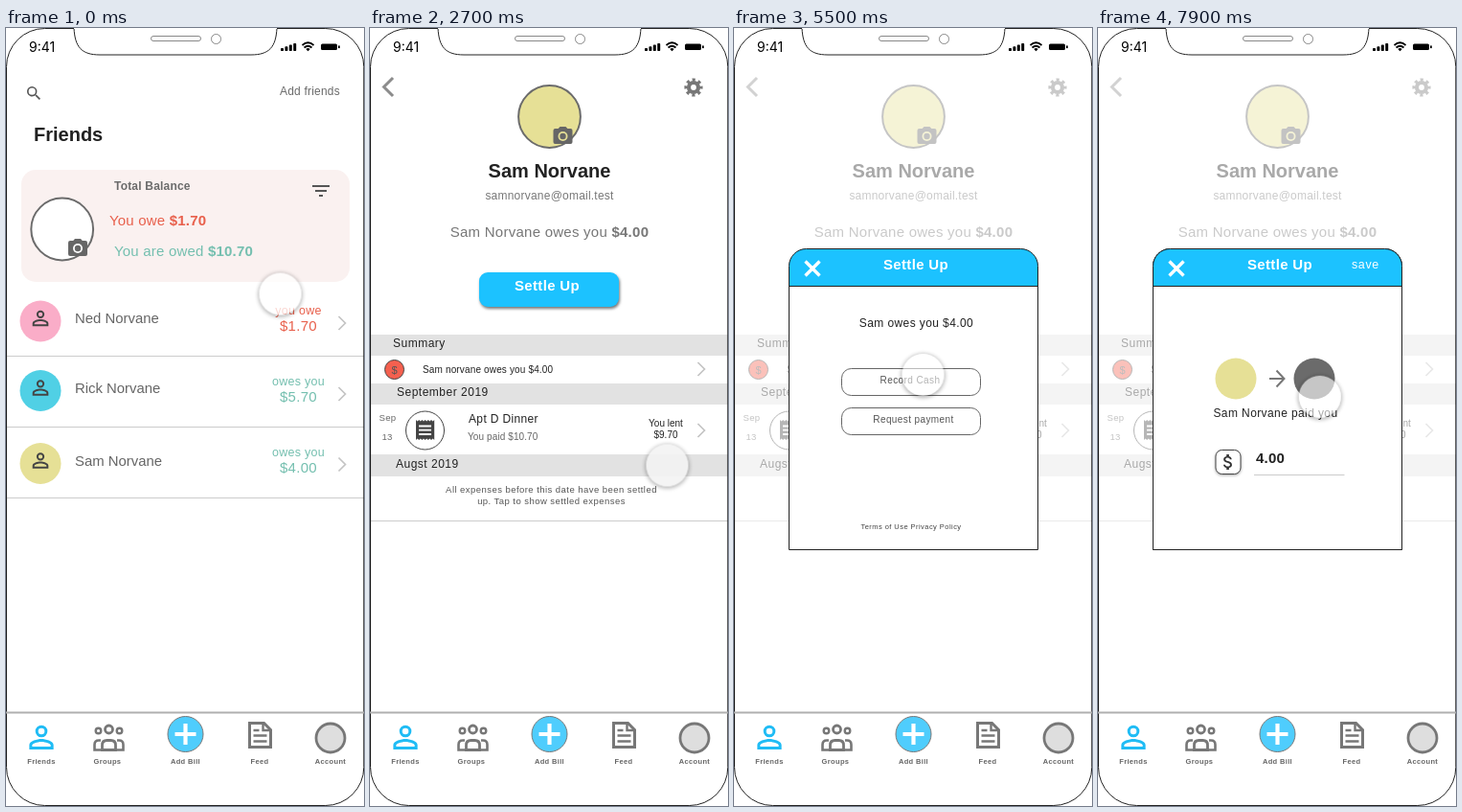
Recreate the animation shown at these times as an HTML page. Size 374 by 812 pixels, loop 8 s.

```html
<!DOCTYPE html>
<html lang="en">
<head>
<meta charset="utf-8">
<title>Settle up</title>
<style>
  html, body { margin: 0; width: 100%; height: 100%; overflow: hidden; background: #fff; }
  svg { position: absolute; left: 0; top: 0; display: block; }
  text { font-family: "Liberation Sans", Arial, sans-serif; white-space: pre; }
  .b { font-weight: bold; }
  #touch {
    position: absolute; left: -22px; top: -22px; width: 44px; height: 44px;
    border-radius: 50%; box-shadow: 0 1px 4px 1px rgba(0, 0, 0, .3);
  }
</style>
</head>
<body>
<svg id="stage" width="374" height="812" viewBox="0 0 374 812"></svg>
<div id="touch"></div>
<script>
const GREY = '#6b6b6b', INK = '#222', BLUE = '#1cc2ff', RED = '#e8604c',
      GREEN = '#74bfaf', YELLOW = '#e6e096', BAR = '#e2e2e2', RULE = '#ccc';

// Icon outlines on a 24 by 24 grid
const ICONS = {
  person: 'M12 5.9a2.1 2.1 0 1 1 0 4.2a2.1 2.1 0 0 1 0-4.2m0 9c2.97 0 6.1 1.46 6.1 2.1v1.1H5.9V17c0-.64 3.13-2.1 6.1-2.1M12 4a4 4 0 1 0 0 8a4 4 0 0 0 0-8zm0 9c-2.67 0-8 1.34-8 4v3h16v-3c0-2.66-5.33-4-8-4z',
  camera: 'M9 2L7.17 4H4a2 2 0 0 0-2 2v12a2 2 0 0 0 2 2h16a2 2 0 0 0 2-2V6a2 2 0 0 0-2-2h-3.17L15 2z',
  search: 'M15.5 14h-.79l-.28-.27A6.5 6.5 0 1 0 13.73 14.43l.27.28v.79l5 4.99L20.49 19zm-6 0a4.5 4.5 0 1 1 0-9a4.5 4.5 0 0 1 0 9z',
  dollar: 'M11.8 10.9c-2.27-.59-3-1.2-3-2.15 0-1.09 1.01-1.85 2.7-1.85 1.78 0 2.44.85 2.5 2.1h2.21c-.07-1.72-1.12-3.3-3.21-3.81V3h-3v2.16c-1.94.42-3.5 1.68-3.5 3.61 0 2.31 1.91 3.46 4.7 4.13 2.5.6 3 1.48 3 2.41 0 .69-.49 1.79-2.7 1.79-2.06 0-2.87-.92-2.98-2.1h-2.2c.12 2.19 1.76 3.42 3.68 3.83V21h3v-2.15c1.95-.37 3.5-1.5 3.5-3.55 0-2.84-2.43-3.81-4.7-4.4z'
};

// Drawing helpers
const text = (x, y, s, size, fill = INK, ls = 0, cls = '', anchor = 'start') =>
  `<text x="${x}" y="${y}" font-size="${size}" fill="${fill}" letter-spacing="${ls}" class="${cls}" text-anchor="${anchor}">${s}</text>`;
const mid = (x, y, s, size, fill, ls, cls) => text(x, y, s, size, fill, ls, cls, 'middle');
const bold = s => `<tspan class="b">${s}</tspan>`;
const line = (d, stroke, w = 1) => `<path d="${d}" fill="none" stroke="${stroke}" stroke-width="${w}"/>`;
const shape = (d, fill) => `<path d="${d}" fill="${fill}" fill-rule="evenodd"/>`;
const disc = (x, y, r, fill, stroke = 'none', w = 1) =>
  `<circle cx="${x}" cy="${y}" r="${r}" fill="${fill}" stroke="${stroke}" stroke-width="${w}"/>`;
const box = (x, y, w, h, r, fill, stroke = 'none', more = '') =>
  `<rect x="${x}" y="${y}" width="${w}" height="${h}" rx="${r}" fill="${fill}" stroke="${stroke}" ${more}/>`;
const group = (id, ...parts) => `<g id="${id}">${parts.join('')}</g>`;
const icon = (name, x, y, k, fill) =>
  `<g transform="translate(${x} ${y}) scale(${k}) translate(-12 -12)">${shape(ICONS[name], fill)}</g>`;

const chevron = (x, y) => line(`M${x} ${y - 7}l7 7l-7 7`, '#c4c4c4', 1.7);
const camera = (x, y, lens) =>
  icon('camera', x, y, 1, '#666') + disc(x, y, 5, lens) + disc(x, y, 3.2, '#666');

const friend = (y, name, label, sum, color, hue, cy, ty) => [
  disc(36, cy, 21.5, hue), icon('person', 36, cy - 3, 1.04, '#444'),
  text(72, ty, name, 14.9, '#666'),
  mid(305.5, y - 9, label, 12.5, color, .3), mid(305.5, y + 8, sum, 15, color, .3),
  chevron(347.5, y)
].join('');

const friends = group('friends',
  icon('search', 29.2, 68.2, .8, '#555'),
  text(286, 70, 'Add friends', 12, GREY, .2),
  text(29, 118, 'Friends', 20, INK, 0, 'b'),
  box(16, 148, 343, 117, 15, '#faf1f0'),
  disc(58.7, 210, 32.4, '#fff', GREY, 2), camera(75, 230, '#fff'),
  line('M320 165h18M323 170h12M327 175h4', '#555', 2),
  text(113, 169, 'Total Balance', 12, GREY, .2, 'b'),
  text(108, 206, 'You owe ' + bold('$1.70'), 15, RED, .2),
  text(113, 238, 'You are owed ' + bold('$10.70'), 15, GREEN, .2),
  friend(308, 'Ned Norvane', 'you owe', '$1.70', RED, '#faadc8', 306, 308),
  friend(382, 'Rick Norvane', 'owes you', '$5.70', GREEN, '#50d0e5', 378.5, 381),
  friend(455.5, 'Sam Norvane', 'owes you', '$4.00', GREEN, YELLOW, 454.5, 457),
  line('M0 342.5H374M0 416.5H374M0 490.5H374', RULE));

const heading = (x, y, h, s, ty) => box(0, y, 374, h, 0, BAR) + text(x, ty, s, 12, INK, .5);

const detail = group('detail',
  box(0, 40, 374, 672, 0, '#fff'),
  line('M24 52l-9.5 9.5l9.5 9.5', '#8c8c8c', 3),
  disc(338, 62, 5, 'none', '#777', 4.2),
  `<circle cx="338" cy="62" r="8" fill="none" stroke="#777" stroke-width="3.2" stroke-dasharray="3.14 3.14" stroke-dashoffset="1.57"/>`,
  disc(187.5, 92.5, 32.4, YELLOW, GREY, 2), camera(201.5, 113, YELLOW),
  mid(187.5, 156, 'Sam Norvane', 20, INK, 0, 'b'),
  mid(187.5, 179, 'samnorvane@omail.test', 12, '#777', .22),
  mid(187.5, 218, 'Sam Norvane owes you ' + bold('$4.00'), 15, '#777', .25),
  box(114, 255, 146, 36, 9, BLUE, 'none', 'style="filter:drop-shadow(1px 2px 1.5px rgba(0,0,0,.55))"'),
  mid(185, 274, 'Settle Up', 15, '#fff', .35, 'b'),
  heading(24, 320, 22, 'Summary', 333),
  heading(28, 371, 22, 'September 2019', 384),
  heading(27, 445, 23, 'Augst 2019', 459),
  disc(25.5, 356.5, 10, '#f4604f', '#444'), mid(25.5, 360.5, '$', 11, '#555'),
  text(55, 360, 'Sam norvane owes you $4.00', 10, INK, .15),
  chevron(342.5, 356), chevron(342.5, 420),
  text(9.5, 410, 'Sep', 9.5, '#666', .3), text(12.5, 430, '13', 9.5, '#666', .3),
  disc(57.5, 420, 20, '#fff', '#444'),
  shape('M48 409l1.6 1.6' + 'l1.6-1.6l1.6 1.6'.repeat(5) + 'l1.6-1.6v21' + 'l-1.6-1.6l-1.6 1.6'.repeat(6) + 'z', '#444'),
  line('M51 415.5h13M51 419.7h13M51 424h13', '#fff', 1.8),
  text(103, 412, 'Apt D Dinner', 12, INK, .35), text(102, 430, 'You paid $10.70', 10, '#666', .1),
  mid(309, 416, 'You lent', 10), mid(309, 428, '$9.70', 10),
  mid(189.5, 485, 'All expenses before this date have been settled', 9.5, '#555', .45),
  mid(189.5, 497, 'up. Tap to show settled expenses', 9.5, '#555', .45),
  line('M0 514.5H374', RULE));

// Dialog frame shared by every step of the payment
const TOP = 'V248.5a18 18 0 0 1 18-18h224a18 18 0 0 1 18 18';
const dialog = (...parts) => [
  shape(`M57.5 544.5${TOP}V544.5z`, '#fff'),
  shape(`M57.5 269.5${TOP}V269.5z`, BLUE),
  line(`M57.5 269.5h260M57.5 544.5${TOP}V544.5z`, INK),
  line('M74.5 243.5l15 15m0-15l-15 15', '#fff', 3.4),
  mid(190, 252, 'Settle Up', 15, '#fff', .35, 'b'), ...parts
].join('');

const option = (y, x, s) => box(112.5, y, 145, 28, 10, '#fff', '#666') + mid(x, y + 15.5, s, 10, '#555', .4);

const choose = group('choose',
  box(1, 40, 372, 672, 0, 'rgba(255,255,255,.61)'),
  dialog(
    mid(190.5, 312, 'Sam owes you $4.00', 12, INK, .4),
    option(355.5, 184, 'Record Cash'), option(396.5, 187.5, 'Request payment'),
    mid(185, 523, 'Terms of Use Privacy Policy', 7.5, '#444', .45)));

const payment = (saveOpacity, field) => dialog(
  `<g opacity="${saveOpacity}">${text(265, 251, 'save', 12.5, '#fff', .6)}</g>`,
  disc(144, 366, 21.5, YELLOW), disc(226, 366, 21.5, GREY),
  line('M179 366h15m-7.5-8.5l8 8.5l-8 8.5', '#777', 2),
  mid(185.5, 406, 'Sam Norvane paid you', 12, INK, .4),
  box(123, 440.5, 26, 25, 6.5, '#fff', '#444', 'style="filter:drop-shadow(0 1px 1.5px rgba(0,0,0,.35))"'),
  icon('dollar', 136, 453, .88, '#333'),
  line('M163 466.5h94.5', RULE), field);

const empty = group('empty', payment(.5, line('M163 450v11.5', '#333')));
const filled = group('filled', payment(1, text(165, 454, '4.00', 15, INK, .2, 'b')));

const tab = (x, s) => mid(x, 767.5, s, 7.5, '#666', .35, 'b');
const NOTCH = 'M71 0C72 20 79 28 98 28H256C275 28 282 20 283 0';
const chrome = group('chrome',
  box(.5, .5, 373.3, 811, 40, 'none', INK),
  shape(NOTCH, '#fff'), line(NOTCH, INK),
  line('M71 .5H283', '#fff', 1.2),
  box(151.5, 8.5, 52, 5, 2.5, '#fff', '#888'), disc(219.5, 11.5, 5, '#fff', '#888'),
  `<text x="24" y="25" font-size="14" style="font-family:Inter,sans-serif">9:41</text>`,
  [0, 1, 2, 3].map(i => box(287 + i * 4.4, 21 - i * 1.7, 3, 3 + i * 1.7, .8, '#000')).join(''),
  line('M309.5 18q6-5.5 12 0M311.5 20.5q4-3.5 8 0', '#000', 1.7),
  shape('M313.3 22q2.2-1.8 4.4 0l-2.2 2.3z', '#000'),
  box(329, 16.5, 17, 6.5, 1.5, '#000'), box(347, 18.2, 1.8, 3, .8, '#000'),
  line('M0 714.5H374', '#b0b0b0', 2),
  icon('person', 37, 740.3, 1.58, '#1fbcf5'),
  disc(107.5, 732, 4, 'none', '#777', 2.8),
  line('M100.5 753.5v-5q0-5 5-5h4q5 0 5 5v5z', '#777', 2.8),
  disc(96.5, 733.5, 2.8, 'none', '#777', 2.4), disc(118.5, 733.5, 2.8, 'none', '#777', 2.4),
  line('M100 753.5h-7.5v-5.5q0-4.5 4.5-4.5h2M115 753.5h7.5v-5.5q0-4.5-4.5-4.5h-2', '#777', 2.6),
  disc(187.5, 737, 18.5, '#4fcdfd', '#777'), line('M176.5 737h22m-11-11v22', '#fff', 4.2),
  line('M254.5 725.5h15l7 7v18h-22z', '#777', 3),
  line('M268.5 725v8h8M258.5 733h6M258.5 738.5h14M258.5 744.5h14', '#777', 2.4),
  disc(339, 741, 15, '#dedede', '#777', 2.8),
  tab(37, 'Friends'), tab(106, 'Groups'), tab(187.5, 'Add Bill'), tab(265, 'Feed'), tab(339, 'Account'));

const $ = id => document.getElementById(id);
$('stage').innerHTML = friends + detail + choose + empty + filled + chrome;

// Motion
const LOOP = 8000;
const play = (el, steps) => el.animate(
  steps.map(([t, props, easing = 'linear']) => ({ offset: t / LOOP, easing, ...props })),
  { duration: LOOP, iterations: Infinity });

const dissolve = (id, start, length) => play($(id), [
  [0, { opacity: 0 }],
  [start, { opacity: 0 }, 'cubic-bezier(.33,.67,.67,1)'],
  [start + length, { opacity: 1 }],
  [LOOP, { opacity: 1 }]
]);
dissolve('detail', 2000, 400);
dissolve('choose', 4300, 400);
dissolve('empty', 5850, 550);
dissolve('filled', 7050, 450);

const at = (t, x, y, easing) => [t, { transform: `translate(${x}px, ${y}px)` }, easing];
const glide = 'ease-in-out';
play($('touch'), [
  at(0, 286.5, 277.5, 'ease-in'), at(450, 316, 370, 'ease-out'), at(900, 310.5, 456.5),
  at(3400, 310.5, 456.5, glide), at(3800, 166.5, 276),
  at(4700, 166.5, 276, glide), at(5150, 197.5, 362),
  at(6350, 197.5, 362, glide), at(6800, 207, 457),
  at(7700, 207, 457, 'ease-in'), at(LOOP, 255, 317)
]);

const rest = { background: 'rgba(255,255,255,.62)' },
      press = { background: 'rgba(255,255,255,.5)' },
      still = { background: 'rgba(243,243,243,.9)' };
play($('touch'), [
  [0, { background: 'rgba(255,255,255,.75)' }], [1000, rest], [1500, press], [2100, press],
  [2500, still], [3400, still], [3600, rest], [3800, press], [4300, press],
  [4600, rest], [5300, rest], [5650, press], [5900, press], [6200, rest],
  [6800, rest], [6950, press], [7100, press], [7400, rest], [LOOP, rest]
]);
</script>
</body>
</html>
```
